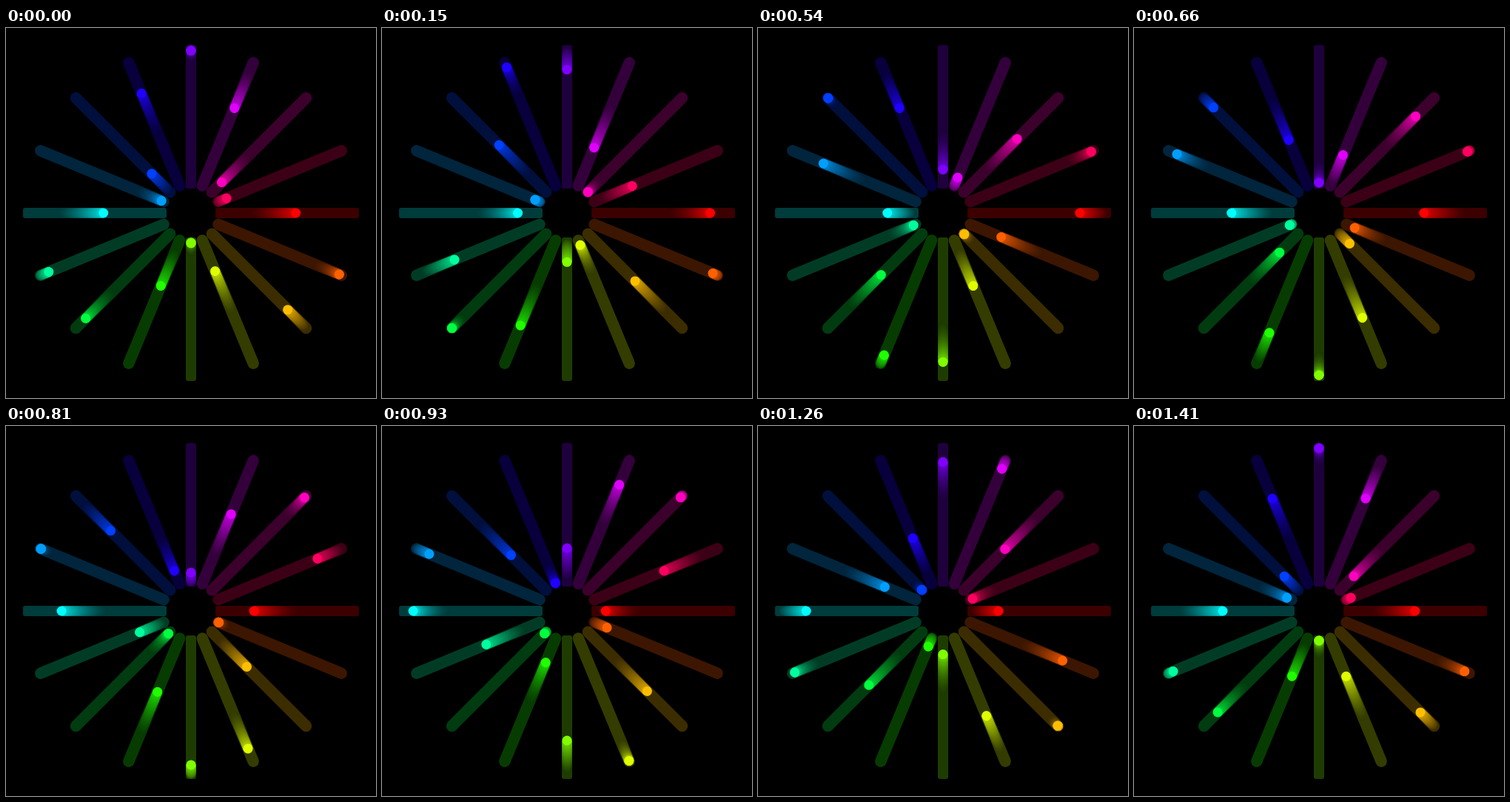
Recreate the animation shown at these times as an HTML page with a canvas. Size 500 by 500 pixels, loop 1440 ms.

```html
<!DOCTYPE html>
<html lang="en">
<head>
<meta charset="utf-8">
<title>Radial pendulum</title>
<style>
  html, body { margin: 0; height: 100%; overflow: hidden; background: #000; }
  canvas { display: block; }
</style>
</head>
<body>
<canvas id="stage" width="500" height="500"></canvas>
<script>
const ctx = document.getElementById('stage').getContext('2d');
const LOOP = 1440, STEP = 30, ARMS = 16;
const MID = 130, SWING = 90, DOT = 6.5;
const TRAIL = 150, SLICES = 60;
const DIM = 11.7, BRIGHT = 50;

const color = (i, glow) =>
  `hsl(${i * 360 / ARMS}, 100%, ${DIM + (BRIGHT - DIM) * glow}%)`;

// Neighbouring arms are three sixteenths of a cycle apart.
const radiusAt = (i, t) =>
  MID + SWING * Math.sin(2 * Math.PI * (t / LOOP + 3 * i / ARMS));

function disc(x, r, fill) {
  ctx.fillStyle = fill;
  ctx.beginPath();
  ctx.arc(x, 0, r, 0, 2 * Math.PI);
  ctx.fill();
}

function track(i) {
  const straight = i % 4 === 0;
  const half = straight ? 7 : 7.7;
  ctx.fillStyle = color(i, 0);
  ctx.beginPath();
  ctx.roundRect(MID - SWING - half, -half, 2 * (SWING + half), 2 * half, straight ? 3 : half);
  ctx.fill();
}

function arm(i, t) {
  ctx.save();
  ctx.translate(250, 250);
  ctx.rotate(2 * Math.PI * i / ARMS);
  track(i);
  for (let s = SLICES; s > 0; s--) {
    const age = s / SLICES;
    disc(radiusAt(i, t - age * TRAIL), DOT, color(i, 0.75 * (1 - age) ** 1.4));
  }
  disc(radiusAt(i, t), DOT, color(i, 1));
  ctx.restore();
}

let last = -1;
function draw(now) {
  const step = Math.floor((now % LOOP) / STEP);
  if (step !== last) {
    last = step;
    ctx.fillStyle = '#000';
    ctx.fillRect(0, 0, 500, 500);
    for (let i = 0; i < ARMS; i++) arm(i, (step + 1) * STEP);
  }
}

const start = performance.now();
function tick() {
  draw(performance.now() - start);
  requestAnimationFrame(tick);
}
tick();
</script>
</body>
</html>
```
